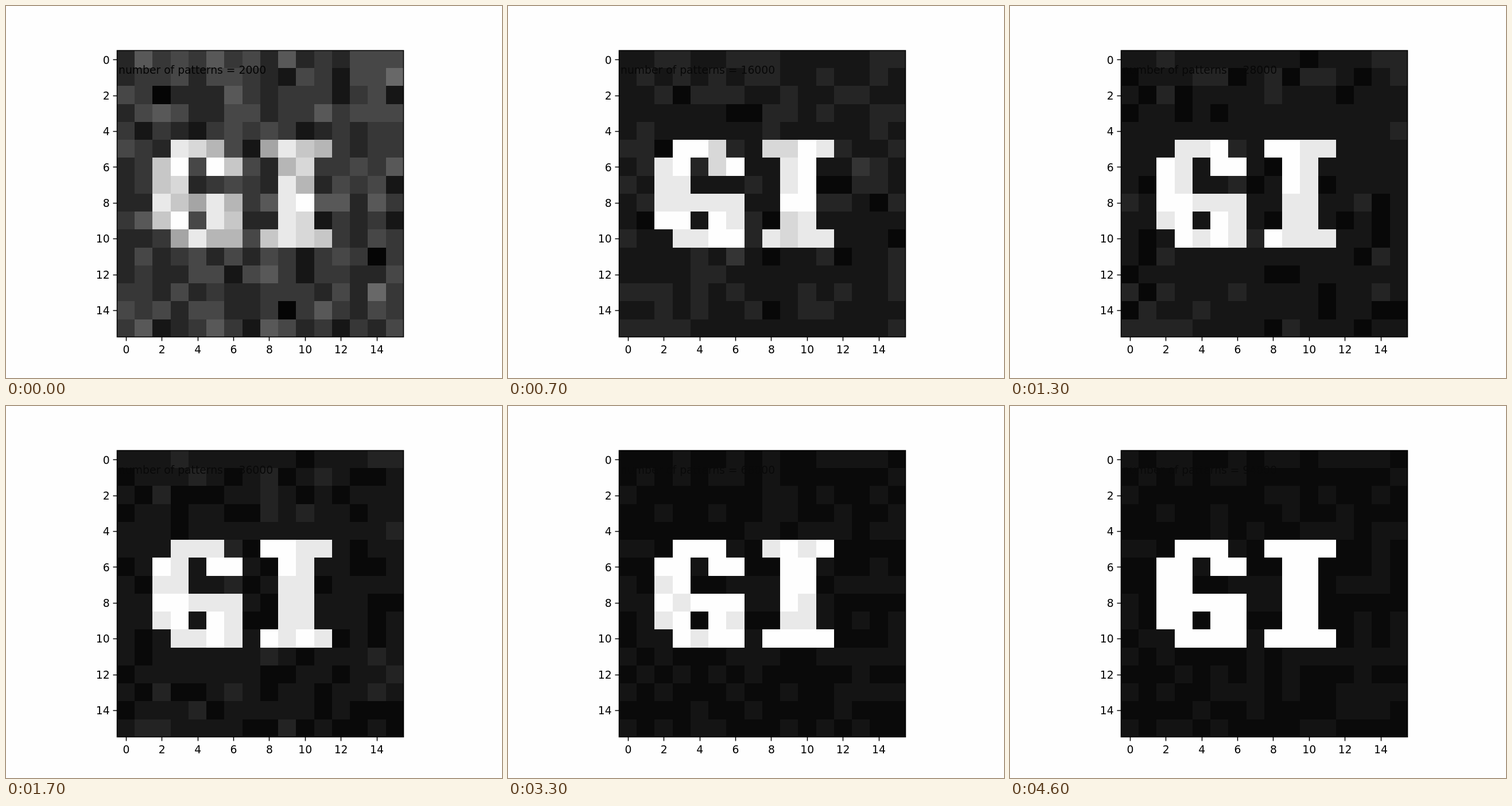
These frames come from a looping animation (864 px wide and 648 px high, 5000 ms). An HTML page:

```html
<!DOCTYPE html>
<html lang="en">
<head>
<meta charset="utf-8">
<title>Pattern reconstruction</title>
<style>
  html, body { margin: 0; width: 100%; height: 100%; overflow: hidden; background: #fefefe; }
  svg { display: block; width: 864px; height: 648px; }
  text { font: 18.75px "DejaVu Sans", sans-serif; }
</style>
</head>
<body>
<svg id="stage" viewBox="0 0 864 648"></svg>
<script>
const LOOP = 5000, STEP = 100, LAST = 46;
const SIZE = 16, LEFT = 193, TOP = 77, CELL = 31.25, SIDE = 499;
const stage = document.getElementById("stage");

// Strokes of the two letters: column, row, width, height
const strokes = [
  [3, 5, 3, 1], [2, 6, 2, 4], [5, 6, 2, 1], [4, 8, 3, 1], [5, 9, 2, 1], [3, 10, 4, 1],
  [8, 5, 4, 1], [9, 6, 2, 4], [8, 10, 4, 1]
];

// Columns in each row that settle darker than their surroundings
const darkColumns = [
  [10], [0, 9, 12], [3, 10], [0, 6, 7], [3, 4, 6], [2, 7], [0, 8, 12], [1, 4, 11],
  [14], [4, 14], [14], [1], [0, 8, 12, 14], [3, 8, 11], [0, 3, 9], [8, 12]
];
const lightCells = [
  [14, 0], [6, 5], [4, 6], [6, 7], [13, 7], [14, 7], [7, 10], [5, 12], [7, 12], [6, 13], [4, 14]
];

// Noise statistics as the number of patterns grows
const keys = [
  { at: 0,  base: 5,  step: 16.5, mean: 3.1,  spread: 1.2, loss: 2.6,  lossSpread: 1.6 },
  { at: 4,  base: 7,  step: 15,   mean: 1.45, spread: 0.6, loss: 1,    lossSpread: 0.75 },
  { at: 10, base: 8,  step: 14.5, mean: 1.15, spread: 0.4, loss: 0.6,  lossSpread: 0.5 },
  { at: 17, base: 9,  step: 13,   mean: 0.92, spread: 0.4, loss: 0.68, lossSpread: 0.4 },
  { at: 26, base: 10, step: 11,   mean: 0.82, spread: 0.3, loss: 0.48, lossSpread: 0.4 },
  { at: 33, base: 10, step: 9.5,  mean: 0.46, spread: 0.3, loss: 0.25, lossSpread: 0.35 },
  { at: 46, base: 10, step: 8.5,  mean: 0.43, spread: 0.3, loss: -0.15, lossSpread: 0.2 }
];

function statsAt(index) {
  const next = Math.max(1, keys.findIndex(key => key.at >= index));
  const a = keys[next - 1], b = keys[next];
  const k = (index - a.at) / (b.at - a.at);
  return Object.fromEntries(Object.keys(a).map(name => [name, a[name] + (b[name] - a[name]) * k]));
}

function add(tag, attributes, content = "") {
  const node = document.createElementNS("http://www.w3.org/2000/svg", tag);
  for (const name in attributes) node.setAttribute(name, attributes[name]);
  node.textContent = content;
  return stage.appendChild(node);
}

function random(seed) {
  let h = Math.imul(seed + 7919, 2654435761);
  h = Math.imul(h ^ (h >>> 15), 2246822519);
  h = Math.imul(h ^ (h >>> 13), 3266489917);
  return ((h ^ (h >>> 16)) >>> 0) / 4294967296;
}

function normal(id, node) {
  const seed = (id * 16 + node) * 3;
  return 2 * (random(seed) + random(seed + 1) + random(seed + 2) - 1.5);
}

// Drifts more and more slowly, with constant variance
function drift(id, index) {
  const phase = Math.log2(index + 1) * 1.3;
  const node = Math.floor(phase), angle = (phase - node) * Math.PI / 2;
  return normal(id, node) * Math.cos(angle) + normal(id, node + 1) * Math.sin(angle);
}

const gray = value => {
  const v = Math.round(Math.min(254, Math.max(0, value)));
  return `rgb(${v},${v},${v})`;
};

// First pixel whose centre lies in cell n
const edge = (start, n) => Math.ceil(start + n * CELL - 0.5);
const cells = [];
for (let row = 0; row < SIZE; row++) {
  for (let col = 0; col < SIZE; col++) {
    const x = edge(LEFT, col), y = edge(TOP, row);
    cells.push({
      id: row * SIZE + col,
      letter: strokes.some(([c, r, w, h]) => col >= c && col < c + w && row >= r && row < r + h),
      bias: darkColumns[row].includes(col) ? -1
        : lightCells.some(([c, r]) => c === col && r === row) ? 1 : 0,
      rect: add("rect", {
        x, y, width: edge(LEFT, col + 1) - x, height: edge(TOP, row + 1) - y,
        "shape-rendering": "crispEdges"
      })
    });
  }
}
const caption = add("text", { x: 196, y: 118 });

const line = { fill: "none", stroke: "#000", "stroke-width": 1.5 };
add("rect", { x: LEFT + 0.5, y: TOP + 0.5, width: SIDE, height: SIDE, ...line });
for (let n = 0; n < SIZE; n += 2) {
  const x = 208.91 + n * 31.185, y = 93.35 + n * 31.185;
  const tickX = Math.round(x) + 0.5, tickY = Math.round(y) + 0.5;
  add("path", { d: `M${tickX} ${TOP + SIDE + 0.5}v7M${LEFT + 0.5} ${tickY}h-7`, ...line });
  add("text", { x: x + 0.5, y: 605, "text-anchor": "middle" }, n);
  add("text", { x: 180.7, y: Math.round(y + 7.2), "text-anchor": "end" }, n);
}

function shade(cell, index, stats) {
  let z = drift(cell.id, index);
  if (cell.letter) {
    const level = Math.round(stats.loss + stats.lossSpread * z);
    return level > 0 ? 250 - 17 * level : 254;
  }
  if (cell.bias) {
    const weight = Math.min(1, 0.3 + index / 15);
    z = z * (1 - 0.6 * weight) + cell.bias * weight * 1.3;
  }
  return stats.base + stats.step * Math.max(0, Math.round(stats.mean + stats.spread * z));
}

let shown = -1;
function draw(time) {
  const index = Math.min(LAST, Math.floor((time % LOOP) / STEP));
  if (index === shown) return;
  shown = index;
  const stats = statsAt(index);
  for (const cell of cells) cell.rect.setAttribute("fill", gray(shade(cell, index, stats)));
  caption.textContent = `number of patterns = ${2000 * (index + 1)}`;
  caption.setAttribute("fill", gray(stats.base));
}

const start = performance.now();
function tick() {
  draw(performance.now() - start);
  requestAnimationFrame(tick);
}
tick();
</script>
</body>
</html>
```
